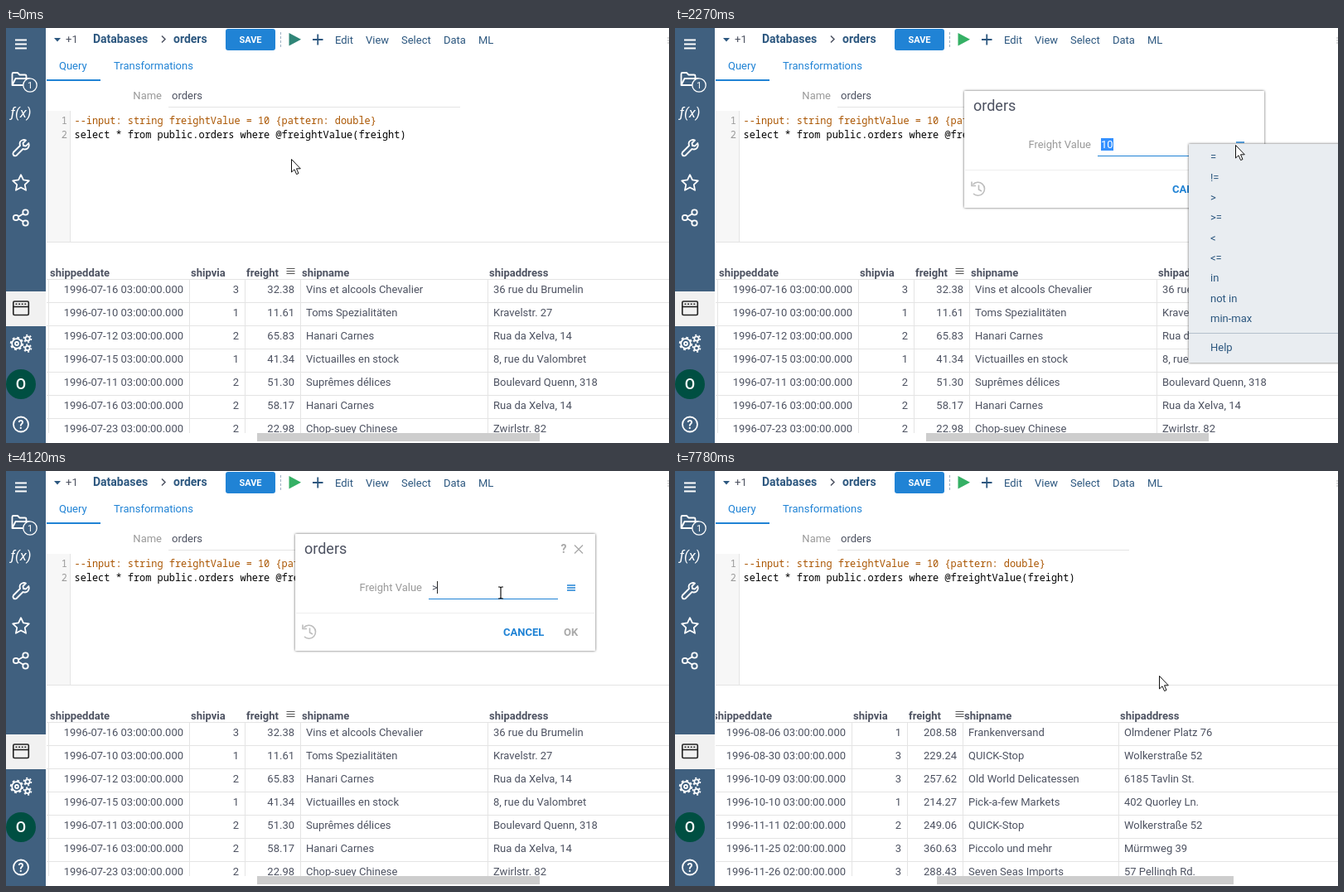
An HTML page that plays this animation: 800x501 px, repeating every 8710 ms.

```html
<!DOCTYPE html>
<html lang="en">
<head>
<meta charset="utf-8">
<title>Parameterized query</title>
<style>
  html, body { margin: 0; width: 100%; height: 100%; overflow: hidden; background: #fff; }
  svg { display: block; width: 800px; height: 501px; font: 13px Roboto, sans-serif; }
  text { fill: #4d5261; white-space: pre; }
  .bold { font-weight: 700; }
  .blue { fill: #2083d5; }
  .navy { fill: #2c577f; }
  .grey { fill: #9a9a9a; }
  .white { fill: #fff; }
  .end { text-anchor: end; }
  .mid { text-anchor: middle; }
  .code { font: 11.91px "Noto Sans Mono", "DejaVu Sans Mono", monospace; }
  .line { fill: none; stroke: #e4e4e4; }
  .icon { fill: none; stroke: #fff; stroke-width: 1.8; stroke-linejoin: round; }
</style>
</head>
<body>
<svg viewBox="0 0 800 501">
  <defs>
    <filter id="shadow" x="-10%" y="-10%" width="120%" height="125%">
      <feDropShadow dx="0" dy="0" stdDeviation="1.6" flood-color="#000" flood-opacity=".65"/>
    </filter>
    <clipPath id="gridClip"><path d="M49 280H800V489H49Z"/></clipPath>
    <path id="bars" d="M0 .5H10M0 3.5H10M0 6.5H10" fill="none"/>
  </defs>

  <g id="toolbar">
    <path d="M58 12H66L62 16.5Z" fill="#2c577f"/>
    <path d="M188 9.5L192 13.5L188 17.5" fill="none" stroke="#4d5261" stroke-width="1.5"/>
    <rect x="265" y="1" width="60" height="26" rx="3" fill="#2083d5"/>
    <path d="M331.5 5V24" stroke="#9db0c2" stroke-dasharray="3 2"/>
    <path id="play" d="M341.5 6V21.5L356 13.75Z"/>
    <path d="M370 14H382.5M376.25 7.5V20.5" stroke="#2c577f" stroke-width="1.8"/>
    <path d="M799 11V19" stroke="#bbb" stroke-dasharray="2 1"/>
    <rect x="49" y="62" width="65" height="2" fill="#2083d5"/>
    <path class="line" d="M196 95.5H548"/>
  </g>

  <g id="editor">
    <rect x="49" y="100" width="28" height="158" fill="#f7f7f7"/>
    <path class="line" d="M77.5 100V258M49 258.5H800"/>
  </g>

  <g clip-path="url(#gridClip)"><g id="before"></g><g id="after"></g></g>
  <use href="#bars" x="338.5" y="290" stroke="#555"/>
  <rect id="scrollbar" y="489" height="10" fill="#cdcdcd"/>

  <g id="sidebar">
    <rect width="48" height="501" fill="#40607f"/>
    <rect y="318" width="48" height="42" fill="#f1f1f1"/>
    <path class="icon" d="M11 14.5H25M11 19.5H25M11 24.5H25"/>
    <path class="icon" d="M7.5 69V55.5Q7.5 54 9 54H14L16.5 56.5H23Q24.5 56.5 24.5 58V60.5M7.5 69L11.5 61H28L24 69Z"/>
    <circle cx="29" cy="69" r="8.2" fill="#40607f" stroke="#fff" stroke-width="1.3"/>
    <path class="icon" d="M9 150L17 142Q15.5 137 19.5 135.5Q22 134.5 24 135.5L20.5 139L21 142L24 142.5L27.3 139Q28.5 142 26.5 144.8Q24 147.5 20.5 146L12.5 154Q10.5 155 9 153.5Q7.8 152 9 150Z"/>
    <path id="star" class="icon"/>
    <path class="icon" d="M13 229L23 223M13 229L23 235"/>
    <g class="icon" style="fill:#40607f">
      <circle cx="12" cy="229" r="3.2"/><circle cx="23.5" cy="222.5" r="3.2"/><circle cx="23.5" cy="235.5" r="3.2"/>
    </g>
    <g fill="none" stroke="#222" stroke-width="1.6">
      <rect x="8.8" y="330" width="18.5" height="16.5" rx="1.5"/>
      <path d="M9 336.5H27"/><path d="M11.5 333.3H25" stroke-dasharray="2 1.6"/>
    </g>
    <g class="icon">
      <circle cx="13" cy="381" r="5.8"/><circle cx="13" cy="381" r="2"/>
      <circle cx="13" cy="381" r="7.3" stroke-dasharray="2.9 2.83"/>
      <circle cx="26" cy="375" r="2.7"/><circle cx="26" cy="375" r="4.4" stroke-dasharray="2 2.6"/>
      <circle cx="26" cy="386.5" r="2.7"/><circle cx="26" cy="386.5" r="4.4" stroke-dasharray="2 2.6"/>
    </g>
    <circle cx="18" cy="430" r="18" fill="#004f42"/>
    <circle class="icon" cx="18" cy="478.5" r="9"/>
  </g>

  <g id="dialog">
    <rect x="349" y="76" width="362" height="141" rx="1" fill="#fff" filter="url(#shadow)"/>
    <path d="M350 171.5H710" stroke="#eee"/>
    <path id="underline" d="M510 154.5H666"/>
    <rect id="selection" x="514" y="133" width="15" height="15" fill="#3390ff"/>
    <path id="caret" d="M0 133V148" stroke="#222"/>
    <use href="#bars" x="677" y="137.5" stroke="#2083d5" stroke-width="1.3"/>
    <g fill="none" stroke="#bdbdbd" stroke-width="1.6">
      <path d="M359.5 189A8 8 0 1 1 360 200M358 185.5V190.5H363M366.5 189.5V195L370 197"/>
    </g>
    <g id="corner"><path d="M686 89.5L696 99.5M696 89.5L686 99.5" stroke="#aaa" stroke-width="1.4"/></g>
  </g>

  <g id="menu">
    <rect x="620" y="140" width="190" height="264" fill="#e9edf1" filter="url(#shadow)"/>
    <rect id="hover" x="620" width="180" height="24.3" fill="#d8dfe6"/>
    <path d="M620 368.5H800" stroke="#b4c0cc"/>
  </g>

  <g id="pointer">
    <circle id="click" cy="1" r="15" fill="#f2e52f" fill-opacity=".82"/>
    <path id="arrow" d="M.5 .5V16L4 12.8L6.6 18.6L9 17.5L6.5 11.8H11.3Z" fill="#fff" stroke="#111"/>
    <path id="beam" d="M-3 -7H-1L0 -6L1 -7H3M0 -6V6M-3 7H-1L0 6L1 7H3" fill="none" stroke="#111" stroke-width="1.2"/>
  </g>
</svg>

<script>
const LOOP = 8710;
const $ = id => document.getElementById(id);

function addText(parent, x, y, string, cls = '', size) {
  const node = document.createElementNS('http://www.w3.org/2000/svg', 'text');
  node.setAttribute('x', x);
  node.setAttribute('y', y);
  node.setAttribute('class', cls);
  if (size) node.style.fontSize = size + 'px';
  node.textContent = string;
  $(parent).append(node);
  return node;
}

function addPath(parent, d) {
  const node = document.createElementNS('http://www.w3.org/2000/svg', 'path');
  node.setAttribute('class', 'line');
  node.setAttribute('d', d);
  $(parent).append(node);
}

// Toolbar, tabs and name field
addText('toolbar', 72, 18, '+1');
addText('toolbar', 105, 18, 'Databases', 'bold navy', 14);
addText('toolbar', 202, 18, 'orders', 'bold navy', 14);
addText('toolbar', 295, 18, 'SAVE', 'bold white mid', 11);
[['Edit', 397], ['View', 434], ['Select', 477], ['Data', 528], ['ML', 570]]
  .forEach(([label, x]) => addText('toolbar', x, 19, label, 'navy'));
addText('toolbar', 64, 50, 'Query', 'blue');
addText('toolbar', 130, 50, 'Transformations', 'blue');
addText('toolbar', 188, 86, 'Name', 'grey end');
addText('toolbar', 200, 86, 'orders');

// Editor
addText('editor', 74, 116, '1', 'code grey end');
addText('editor', 74, 133, '2', 'code grey end');
addText('editor', 82.5, 116, '--input: string freightValue = 10 {pattern: double}', 'code').style.fill = '#a50';
addText('editor', 82.5, 133, 'select * from public.orders where @freightValue(freight)', 'code').style.fill = '#000';

// Sidebar
addText('sidebar', 29, 73, '1', 'white mid', 11);
addText('sidebar', 18, 108, 'ƒ(x)', 'white mid', 17).style.fontStyle = 'italic';
addText('sidebar', 18, 436, 'O', 'white mid', 18).style.fontWeight = 500;
addText('sidebar', 18, 483.5, '?', 'white bold mid', 14);
$('star').setAttribute('d', 'M' + Array.from({ length: 10 }, (_, i) => {
  const r = i % 2 ? 5 : 10.3, a = i * Math.PI / 5;
  return [18 + r * Math.sin(a), 187.5 - r * Math.cos(a)];
}).join('L') + 'Z');

// Result grids
function buildGrid(id, dx, addressX, rows) {
  const headers = [['shippeddate', 53], ['shipvia', 223], ['freight', 290], ['shipname', 357]];
  headers.forEach(([name, x]) => addText(id, x + dx, 300, name, 'bold'));
  addText(id, addressX, 300, 'shipaddress', 'bold');
  let lines = 'M49 303.5H800';
  for (const x of [51.5, 221.5, 288.5, 355.5]) lines += `M${x + dx} 304V489`;
  lines += `M${addressX - 1.5} 304V489`;
  rows.forEach(([day, hour, via, freight, name, address], i) => {
    const y = 320 + 28 * i;
    lines += `M49 ${y + 11.5}H800`;
    addText(id, 214 + dx, y, `1996-${day} ${hour}:00:00.000`, 'end');
    addText(id, 281 + dx, y, via, 'end');
    addText(id, 348 + dx, y, freight, 'end');
    addText(id, 362 + dx, y, name);
    addText(id, addressX + 5, y, address);
  });
  addPath(id, lines);
}

buildGrid('before', 0, 583, [
  ['07-16', '03', 3, '32.38', 'Vins et alcools Chevalier', '36 rue du Brumelin'],
  ['07-10', '03', 1, '11.61', 'Toms Spezialitäten', 'Kravelstr. 27'],
  ['07-12', '03', 2, '65.83', 'Hanari Carnes', 'Rua da Xelva, 14'],
  ['07-15', '03', 1, '41.34', 'Victuailles en stock', '8, rue du Valombret'],
  ['07-11', '03', 2, '51.30', 'Suprêmes délices', 'Boulevard Quenn, 318'],
  ['07-16', '03', 2, '58.17', 'Hanari Carnes', 'Rua da Xelva, 14'],
  ['07-23', '03', 2, '22.98', 'Chop-suey Chinese', 'Zwirlstr. 82'],
]);
buildGrid('after', -8, 537, [
  ['08-06', '03', 1, '208.58', 'Frankenversand', 'Olmdener Platz 76'],
  ['08-30', '03', 3, '229.24', 'QUICK-Stop', 'Wolkerstraße 52'],
  ['10-09', '03', 3, '257.62', 'Old World Delicatessen', '6185 Tavlin St.'],
  ['10-10', '03', 1, '214.27', 'Pick-a-few Markets', '402 Quorley Ln.'],
  ['11-11', '02', 2, '249.06', 'QUICK-Stop', 'Wolkerstraße 52'],
  ['11-25', '02', 3, '360.63', 'Piccolo und mehr', 'Mürmweg 39'],
  ['11-26', '02', 3, '288.43', 'Seven Seas Imports', '57 Pellingh Rd.'],
]);

// Dialog and menu
addText('dialog', 360, 100, 'orders', '', 18);
addText('dialog', 502, 145, 'Freight Value', 'grey end');
const value = addText('dialog', 514, 145, '10');
addText('dialog', 600, 199, 'CANCEL', 'bold blue');
const ok = addText('dialog', 673, 199, 'OK', 'bold');
addText('corner', 669.5, 99, '?', 'bold', 14).style.fill = '#aaa';
const ROW = 24.3, MENU_TOP = 145;
['=', '!=', '>', '>=', '<', '<=', 'in', 'not in', 'min-max']
  .forEach((label, i) => addText('menu', 646, 160.4 + ROW * i, label, 'navy'));
addText('menu', 646, 390, 'Help', 'navy');

// Pointer path: time, x, y
const path = [
  [0, 344, 158], [60, 344, 158], [550, 345, 18], [950, 345, 18], [1120, 346, 92],
  [1180, 346, 92], [1800, 662, 139], [2000, 676, 141], [2400, 676, 141], [2720, 688, 204],
  [2790, 688, 206], [3330, 688, 206], [3720, 597, 147], [4120, 597, 147], [4410, 584, 247],
  [LOOP, 584, 247],
];
const clicks = [[690, 950], [2070, 2240], [3190, 3390], [3850, 4050]];
const typed = [[0, '10'], [3330, '>'], [5330, '>2'], [5670, '>20'], [5930, '>200']];

function pointerAt(t) {
  const i = path.findIndex(p => p[0] > t);
  const [t0, x0, y0] = path[i - 1], [t1, x1, y1] = path[i];
  const u = (t - t0) / (t1 - t0), k = u * u * (3 - 2 * u);
  return [x0 + (x1 - x0) * k, y0 + (y1 - y0) * k];
}

const between = (v, a, b) => v >= a && v < b;
const show = (id, on) => { $(id).style.display = on ? '' : 'none'; };

function render(t) {
  const [x, y] = pointerAt(t);
  const dialog = between(t, 1330, 6390), menu = between(t, 2130, 3330);
  const selected = t < 3190, focused = t >= 3860;
  const text = typed.findLast(([start]) => t >= start)[1];

  show('before', t < 7780);
  show('after', t >= 7780);
  $('scrollbar').setAttribute('x', t < 7780 ? 303 : 316);
  $('scrollbar').setAttribute('width', t < 7780 ? 341 : 358);
  $('play').setAttribute('fill', t < 520 ? '#2f8577' : '#35b065');

  show('dialog', dialog);
  show('corner', !menu && between(x, 349, 711) && between(y, 76, 217));
  show('selection', selected);
  value.textContent = text;
  value.style.fill = selected ? '#fff' : '';
  $('underline').setAttribute('stroke',
    selected || focused ? '#2083d5' : t < 3330 ? '#ddd' : '#b4504e');
  ok.style.fill = text.length > 1 ? '#2083d5' : '#aaa';
  show('caret', focused && !between(t, 4400, 4930));
  $('caret').setAttribute('transform', `translate(${Math.floor(513.2 + 7.3 * text.length) + .5})`);

  const row = Math.floor((y - MENU_TOP) / ROW);
  show('menu', menu);
  show('hover', row >= 0);
  $('hover').setAttribute('y', MENU_TOP + ROW * row);

  const beam = dialog
    ? !menu && between(x, 510, 666) && between(y, 130, 156)
    : between(y, 72, 98);
  show('beam', beam);
  show('arrow', !beam);
  show('click', clicks.some(([a, b]) => between(t, a, b)));
  $('pointer').setAttribute('transform', `translate(${Math.round(x)} ${Math.round(y)})`);
}

const start = performance.now();
function tick() {
  render((performance.now() - start) % LOOP);
  requestAnimationFrame(tick);
}
tick();
</script>
</body>
</html>
```
